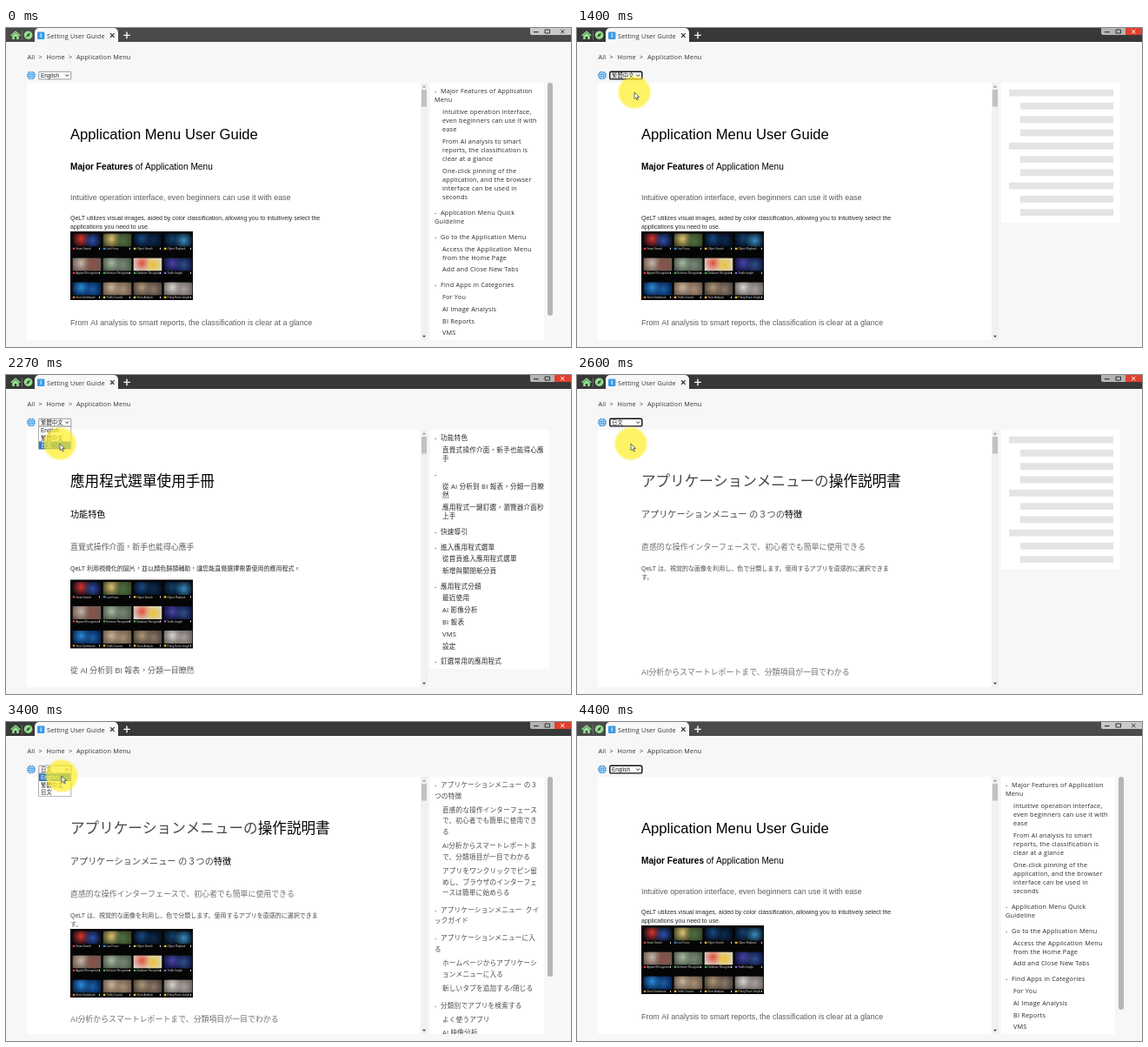
These frames come from a looping animation (650x367 px, 4470 ms). An HTML page with a canvas:

```html
<!DOCTYPE html>
<html lang="en">
<head>
<meta charset="utf-8">
<title>Setting User Guide</title>
<style>
html, body { margin: 0; width: 100%; height: 100%; overflow: hidden; background: #f7f7f7; }
canvas { display: block; width: 650px; height: 367px; }
</style>
</head>
<body>
<canvas id="stage"></canvas>
<script>
const LOOP = 4470, STEPS = 67;
const canvas = document.getElementById('stage'), ctx = canvas.getContext('2d');
const dpr = window.devicePixelRatio || 1;
canvas.width = 650 * dpr;
canvas.height = 367 * dpr;

const SANS = '"Liberation Sans", Arial', UI = '"Open Sans", "Noto Sans"';
const CJK = { en: '', zh: ', "Noto Sans CJK TC"', ja: ', "Noto Sans CJK JP"' };
const OPTIONS = [['en', 'English'], ['zh', '繁體中文'], ['ja', '日文']];

// Lines of the page: x is fixed; [baseline, size, colour, text, weight, second text, its colour]
const GREY = '#5c5c5c', INK = '#2a2a2a', SOFT = '#484848';
const PAGES = {
  en: { imageY: 234, bar: 268, ink: INK, lines: [
    [128, 16.6, '#000', 'Application Menu User Guide'],
    [163, 10.15, '#000', 'Major Features', 700, ' of Application Menu', '#000'],
    [198, 8.92, GREY, 'Intuitive operation interface, even beginners can use it with ease'],
    [220.8, 7.02, INK, 'QeLT utilizes visual images, aided by color classification, allowing you to intuitively select the'],
    [231.2, 7.02, INK, 'applications you need to use.'],
    [341.8, 8.92, GREY, 'From AI analysis to smart reports, the classification is clear at a glance']] },
  zh: { imageY: 235.5, bar: 0, ink: INK, lines: [
    [128.2, 16.6, '#000', '應用程式選單使用手冊'],
    [164, 10.15, '#000', '功能特色'],
    [201.4, 8.92, GREY, '直覺式操作介面，新手也能得心應手'],
    [224.6, 7.02, INK, 'QeLT 利用視覺化的圖片，並以顏色歸類輔助，讓您能直覺選擇需要使用的應用程式。'],
    [343.3, 8.92, GREY, '從 AI 分析到 BI 報表，分類一目瞭然']] },
  ja: { imageY: 238, bar: 230, ink: SOFT, lines: [
    [127.6, 16.6, SOFT, 'アプリケーションメニューの', 400, '操作説明書', '#000'],
    [164.3, 10.15, SOFT, 'アプリケーションメニュー の３つの', 400, '特徴', '#000'],
    [201.4, 8.92, '#707070', '直感的な操作インターフェースで、初心者でも簡単に使用できる'],
    [224.6, 7.02, SOFT, 'QeLT は、視覚的な画像を利用し、色で分類します。使用するアプリを直感的に選択できま'],
    [235, 7.02, SOFT, 'す。'],
    [345.2, 8.92, '#707070', 'AI分析からスマートレポートまで、分類項目が一目でわかる']] }
};

// Middle of each line, then its text: "- " heading, "> " child, otherwise continued heading
const MENUS = {
  en: `72 - Major Features of Application
82 Menu
96 > Intuitive operation interface,
106 > even beginners can use it with
116 > ease
130 > From AI analysis to smart
140 > reports, the classification is
150 > clear at a glance
164 > One-click pinning of the
174 > application, and the browser
184 > interface can be used in
194 > seconds
212 - Application Menu Quick
222 Guideline
240 - Go to the Application Menu
254 > Access the Application Menu
264 > from the Home Page
277 > Add and Close New Tabs
295 - Find Apps in Categories
309 > For You
323 > AI Image Analysis
337 > BI Reports
350 > VMS`,
  zh: `72 - 功能特色
86 > 直覺式操作介面，新手也能得心應
96 > 手
114 - 
128 > 從 AI 分析到 BI 報表，分類一目瞭
138 > 然
152 > 應用程式一鍵釘選，瀏覽器介面秒
162 > 上手
180 - 快速導引
198 - 進入應用程式選單
211 > 從首頁進入應用程式選單
225 > 新增與關閉新分頁
243 - 應用程式分類
256 > 最近使用
270 > AI 影像分析
284 > BI 報表
298 > VMS
312 > 設定
329 - 釘選常用的應用程式`,
  ja: `72 - アプリケーションメニュー の３
85 つの特徴
101 > 直感的な操作インターフェース
113 > で、初心者でも簡単に使用でき
126 > る
142 > AI分析からスマートレポートま
155 > で、分類項目が一目でわかる
171 > アプリをワンクリックでピン留
184 > めし、ブラウザのインターフェ
196 > ースは簡単に始めらる
216 - アプリケーションメニュー  クイ
228 ックガイド
248 - アプリケーションメニューに入
261 る
277 > ホームページからアプリケーシ
290 > ョンメニューに入る
306 > 新しいタブを追加する/閉じる
326 - 分類別でアプリを検索する
342 > よく使うアプリ
357 > AI 映像分析`
};

// Label, badge colour, then background and two glow colours
const TILES = [
  ['Smart Search', '#e23b2e', '#0a0a14', '#d8352c', '#2c50b0'],
  ['Live Focus', '#2f8de0', '#3a4426', '#e0c070', '#4a7040'],
  ['Object Search', '#f0c030', '#050b18', '#174a86', '#0d2c50'],
  ['Object Playback', '#f0c030', '#050e1c', '#12406a', '#3a8cc0'],
  ['Apparel Recognition', '#e23b2e', '#6e5a50', '#c4b4a8', '#8c5048'],
  ['Behavior Recognition', '#3fae4a', '#4c5a48', '#a8b8a4', '#788878'],
  ['Database Recognition', '#3fae4a', '#d8d4cc', '#e0503a', '#ecc22e'],
  ['Traffic Insight', '#8a5be0', '#0e123a', '#4a44a8', '#30508c'],
  ['Store Dashboard', '#e07a2e', '#04204c', '#2c8bd8', '#1c60a8'],
  ['Traffic Counter', '#f0c030', '#6a5848', '#c8b49c', '#a89078'],
  ['Store Analysis', '#f0c030', '#4c4238', '#b09878', '#8c7868'],
  ['Fitting Room Insight', '#f0c030', '#6a6460', '#d8d6d2', '#a8a09c']
];

function box(x, y, w, h, color, r = 0) {
  ctx.fillStyle = color;
  ctx.beginPath();
  ctx.roundRect(x, y, w, h, r);
  ctx.fill();
}
function disc(x, y, r, color) {
  ctx.fillStyle = color;
  ctx.beginPath();
  ctx.arc(x, y, r, 0, 7);
  ctx.fill();
}
function path(d, color, width, fill, x = 0, y = 0) {
  const p = new Path2D(d);
  ctx.save();
  ctx.translate(x, y);
  if (fill) { ctx.fillStyle = fill; ctx.fill(p); }
  if (width) { ctx.strokeStyle = color; ctx.lineWidth = width; ctx.stroke(p); }
  ctx.restore();
}
function text(s, x, y, size, color, family = SANS, weight = 400, spacing = 0) {
  ctx.font = `${weight} ${size}px ${family}, sans-serif`;
  ctx.letterSpacing = spacing + 'px';
  ctx.fillStyle = color;
  ctx.fillText(s, x, y);
  return x + ctx.measureText(s).width;
}
const label = (s, x, y, color = '#333') => text(s, x, y, 7.3, color, UI, 400, .18);

function titleBar(active) {
  box(0, 0, 650, 16, active ? '#383838' : '#4a4a4a');
  path('M5.6 8.8 L11 4 L16.4 8.8', '#93e08d', 1.3);
  path('M7.2 8.8 L11 5.6 L14.8 8.8 V13 H12.2 V10 H9.8 V13 H7.2 Z', '', 0, '#93e08d');
  box(18, 3, .8, 11, '#777');
  disc(25.6, 8.2, 4.8, '#93e08d');
  path('M28 5.6 L26.6 9.2 L23.2 10.8 L24.6 7.2 Z', '', 0, '#3c4a3c');
  box(33, 0, 96, 17, '#f7f7f7', [5, 5, 0, 0]);
  box(36, 4.5, 8.4, 8.4, '#3a9be6', 1);
  text('i', 39.3, 11.2, 7, '#fff', SANS, 700);
  label('Setting User Guide', 47, 11.5);
  path('M120 6.2 L124.6 10.8 M124.6 6.2 L120 10.8', '#222', 1.1);
  path('M135.2 8.4 H142.8 M139 4.6 V12.2', '#fff', 1.4);
  box(603, 0, 47, 8, active ? '#b4b4b4' : '#c9c9c9', [0, 0, 0, 2]);
  if (active) box(631, 0, 19, 8, '#e2402f');
  path('M607 4.6 H612.5', '#333', 1.2);
  path('M620 2 H625.5 V6 H620 Z', '#333', 1);
  path('M638.2 2 L642.4 6.2 M642.4 2 L638.2 6.2', active ? '#fff' : '#333', 1);
}

function glow(x, y, r, color) {
  const g = ctx.createRadialGradient(x, y, 0, x, y, r);
  g.addColorStop(0, color);
  g.addColorStop(1, color + '00');
  disc(x, y, r, g);
}

function picture(y0) {
  box(74, y0, 141, 79, '#050505');
  TILES.forEach(([name, badge, base, a, b], i) => {
    const x = 76.5 + i % 4 * 35, y = y0 + 2.5 + Math.floor(i / 4) * 28;
    ctx.save();
    ctx.beginPath();
    ctx.rect(x, y, 33, 15);
    ctx.clip();
    box(x, y, 33, 15, base);
    glow(x + 10, y + 6, 11, a);
    glow(x + 23, y + 8, 11, b);
    ctx.restore();
    box(x + .3, y + 16.2, 2.6, 2.2, badge, .4);
    text(name, x + 4, y + 18.5, 2.9, '#ddd');
    box(x + 30.5, y + 16.2, 1, 2.2, '#ccc');
  });
}

function page(lang, withImage) {
  box(24, 63, 453, 296, '#fff');
  const family = SANS + CJK[lang], p = PAGES[lang];
  for (const [y, size, color, s, weight, s2, color2] of p.lines) {
    const end = text(s, 74, y, size, color, family, weight);
    if (s2) text(s2, end, y, size, color2, family);
  }
  if (withImage) picture(p.imageY);
  box(477, 63, 8, 296, '#f1f1f1');
  box(478, 71, 6, 19.5, '#c1c1c1');
  path('M479 68.5 L481 66 L483 68.5 Z', '', 0, '#999');
  path('M479 353.8 L481 356.3 L483 353.8 Z', '', 0, '#505050');
}

function skeleton() {
  box(488, 63, 137, 161, '#fff');
  for (let i = 0; i < 10; i++) {
    const x = [0, 4, 7].includes(i) ? 497 : 510;
    box(x, 70.8 + i * 15.27, 617 - x, 7.8, '#e4e4e4');
  }
}

function menu(lang) {
  const { bar, ink } = PAGES[lang], size = lang == 'en' ? 7.3 : 7.6;
  const put = (s, x, y) => text(s, x, y, size, ink, UI + CJK[lang], 400, .2);
  ctx.save();
  ctx.beginPath();
  ctx.rect(488, 63, bar ? 131 : 137, bar ? 296 : 275);
  ctx.clip();
  box(488, 63, 137, 296, '#fff');
  for (const line of MENUS[lang].split('\n')) {
    const [, mid, mark, s] = line.match(/^(\d+) ([->] )?(.*)$/), y = +mid + 2.7;
    if (mark == '- ') put('-', 493, y);
    put(s, mark == '- ' ? 500 : mark ? 502 : 493, y);
  }
  ctx.restore();
  if (bar) box(623, 63, 6, bar, '#b5b5b5', 3);
}

function globe() {
  disc(29, 54.5, 4.8, '#2f8fdc');
  path('M24.5 54.5 H33.5 M29 50 V59 M25.3 52.2 H32.7 M25.3 56.8 H32.7 M29 50 C25.6 52 25.6 57 29 59 C32.4 57 32.4 52 29 50', '#e4f2fc', .6);
}

function select(value, open, focused, hover) {
  const family = SANS + CJK.zh;
  ctx.beginPath();
  ctx.roundRect(37.8, 50.3, 37, 8.6, focused ? 1.5 : .5);
  ctx.fillStyle = '#fff';
  ctx.fill();
  ctx.strokeStyle = focused ? '#111' : '#808080';
  ctx.lineWidth = focused ? 1.4 : .8;
  ctx.stroke();
  text(OPTIONS[value][1], 40, 56.9, 6.4, '#222', family);
  path('M68.4 53.6 L70.2 55.5 L72 53.6', '#222', 1);
  if (!open) return;
  box(37.4, 59, 37.8, 26.6, '#777');
  box(38, 59.4, 36.6, 25.6, '#fff');
  box(38, 59.6 + hover * 8.5, 36.6, 8.5, '#2c79c4');
  OPTIONS.forEach(([, s], i) => text(s, 40, 66.1 + i * 8.5, 6.4, i == hover ? '#fff' : '#222', family));
}

// Pointer path: step, x, y
const MOVES = [[1, 680, 325], [9, 65, 53], [12, 65, 53], [17, 66, 74], [26, 66, 74], [27, 66, 64],
  [28, 66, 55], [30, 66, 55], [34, 62, 79], [42, 62, 79], [44, 64, 54], [47, 64, 54], [50, 64, 62],
  [57, 64, 62], [64, 680, 335]];

function pointerAt(n) {
  const i = MOVES.findIndex(m => m[0] > n);
  if (i < 1) return null;
  const [n0, x0, y0] = MOVES[i - 1], [n1, x1, y1] = MOVES[i];
  const u = (n - n0) / (n1 - n0), e = u * u * (3 - 2 * u);
  return [x0 + (x1 - x0) * e, y0 + (y1 - y0) * e];
}

function pointer([x, y]) {
  const halo = ctx.createRadialGradient(x, y, 0, x, y, 20);
  halo.addColorStop(.84, 'rgba(253, 238, 36, .7)');
  halo.addColorStop(1, 'rgba(253, 238, 36, 0)');
  disc(x, y, 20, halo);
  path('M0 0 V7.6 L1.8 6 L3.1 8.9 L4.4 8.3 L3.1 5.5 H5.5 Z', '#444', .8, '#fff', x, y);
}

const within = (n, spans) => spans.some(([a, b]) => n >= a && n < b);
const latest = (n, marks) => marks.filter(m => n >= m).length % 3;

function draw(n) {
  const chosen = latest(n, [18, 35, 52]);
  const shown = OPTIONS[latest(n, [23, 37, 54])][0];
  const open = within(n, [[12, 18], [30, 35], [47, 52]]);
  const loading = within(n, [[18, 24], [35, 41], [52, 55]]);
  const imageMissing = within(n, [[23, 24], [37, 41], [54, 55]]);
  const at = pointerAt(n);
  const hover = !at || at[1] < 59 ? chosen : Math.min(2, Math.floor((at[1] - 59) / 8.5));

  ctx.setTransform(dpr, 0, 0, dpr, 0, 0);
  box(0, 0, 650, 367, '#f7f7f7');
  titleBar(n >= 12 && n < 66);
  label('All', 24.5, 36);
  label('>', 37.5, 36);
  label('Home', 46.5, 36);
  label('>', 72, 36);
  label('Application Menu', 81, 36);
  globe();
  page(shown, !imageMissing);
  if (loading) skeleton(); else menu(shown);
  select(chosen, open, n >= 18 && !open, hover);
  if (at) pointer(at);
}

function tick() {
  const t = performance.now() % LOOP;
  draw(Math.floor(t / LOOP * STEPS + .1) % STEPS);
  requestAnimationFrame(tick);
}
tick();
</script>
</body>
</html>
```
